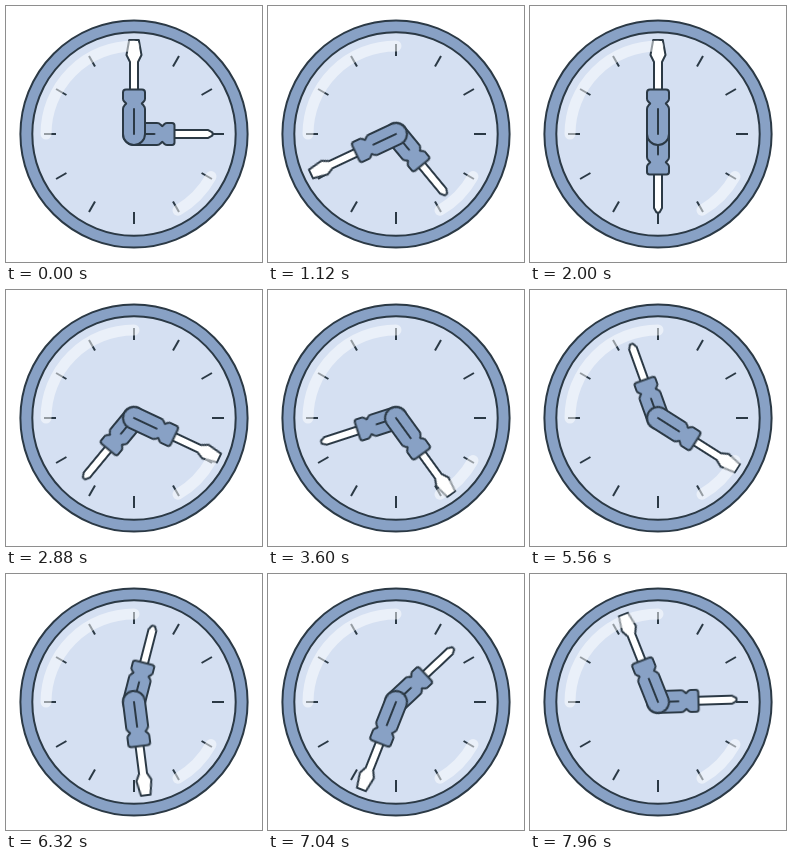
These frames come from a looping animation (256 by 256 pixels, 8000 ms). An HTML page:

```html
<!DOCTYPE html>
<html lang="en">
<head>
<meta charset="utf-8">
<title>Screwdriver clock</title>
<style>
  html, body { margin: 0; width: 100%; height: 100%; overflow: hidden; background: #fff; }
  svg { display: block; width: 100%; height: 100%; }
  .line { stroke: #2b3945; stroke-width: 2; stroke-linejoin: round; }
  .rim, .handle { fill: #88a1c5; }
  .face { fill: #d5e0f2; }
  .steel { fill: #fff; }
  .groove { fill: none; stroke-linecap: round; }
  .shine { fill: none; stroke: #fff; stroke-width: 11; stroke-linecap: round; opacity: .5; }

  /* Both hands tick every 40 ms; the minute hand turns twelve times per loop. */
  .hand { animation: turn 8s steps(200) infinite; }
  .hour { --from: 90deg; --to: 450deg; }
  .minute { --from: 0deg; --to: 4320deg; }
  @keyframes turn {
    from { transform: rotate(var(--from)); }
    to { transform: rotate(var(--to)); }
  }
</style>
</head>
<body>
<svg viewBox="-128 -128 256 256">
  <circle class="line rim" r="113.6"/>
  <circle class="line face" r="101.7"/>
  <g id="ticks"></g>

  <g class="hand hour">
    <path class="line steel" d="M-4 -39V-74L-1.5 -78.5H1.5L4 -74V-39Z"/>
    <path class="line handle" d="M-11 0V-23Q-11 -25 -9.7 -26.2L-7.8 -28.2L-10 -30.5Q-11 -31.5 -11 -33V-38Q-11 -40.5 -8.5 -40.5H8.5Q11 -40.5 11 -38V-33Q11 -31.5 10 -30.5L7.8 -28.2L9.7 -26.2Q11 -25 11 -23V0A11 11 0 0 1 -11 0Z"/>
    <path class="line groove" d="M0 0V-20.5"/>
  </g>

  <g class="hand minute">
    <path class="line steel" d="M-4 -43V-72L-7.5 -79L-4.8 -94H4.8L7.5 -79L4 -72V-43Z"/>
    <path class="line handle" d="M-11 0V-25Q-11 -27 -9.7 -28.3L-7.8 -30.5L-10 -32.8Q-11 -33.8 -11 -35.5V-41.5Q-11 -44.6 -8 -44.6H8Q11 -44.6 11 -41.5V-35.5Q11 -33.8 10 -32.8L7.8 -30.5L9.7 -28.3Q11 -27 11 -25V0A11 11 0 0 1 -11 0Z"/>
    <path class="line groove" d="M0 0V-25"/>
  </g>

  <path class="shine" d="M-88 0A88 88 0 0 1 0 -88"/>
  <path class="shine" d="M77 42.5A88 88 0 0 1 44 76.2"/>
</svg>
<script>
  const ticks = document.getElementById('ticks');
  for (let hour = 0; hour < 12; hour++) {
    const tick = document.createElementNS('http://www.w3.org/2000/svg', 'path');
    tick.setAttribute('class', 'line');
    tick.setAttribute('d', 'M0 -78V-90');
    tick.setAttribute('transform', `rotate(${hour * 30})`);
    ticks.append(tick);
  }
</script>
</body>
</html>
```
